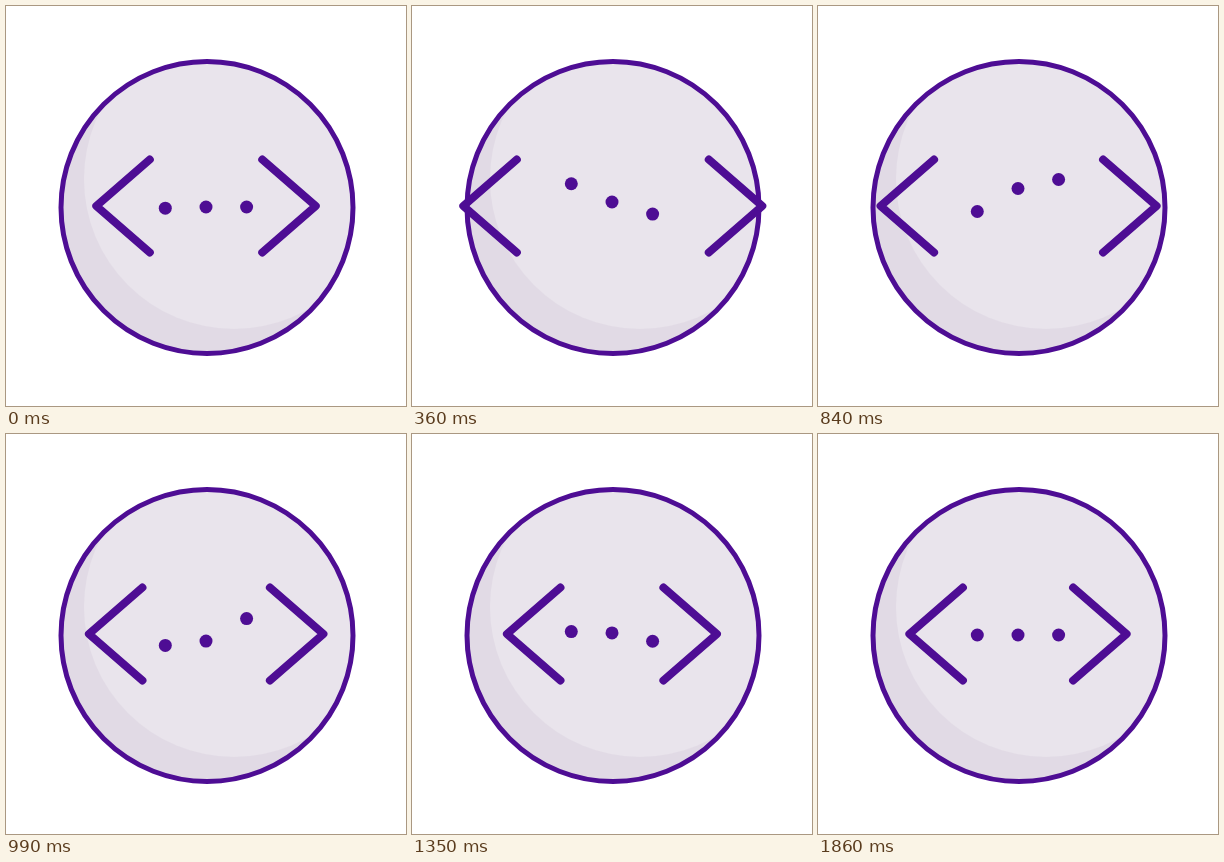
Animation, 400 px wide and 400 px high, one loop 1.92 s. Source, as an HTML page with a canvas:

```html
<!DOCTYPE html>
<html lang="en">
<head>
<meta charset="utf-8">
<title>Code badge</title>
<style>
  html, body { margin: 0; width: 100%; height: 100%; overflow: hidden; background: #fff; }
  canvas { display: block; width: 400px; height: 400px; }
</style>
</head>
<body>
<canvas id="stage" width="400" height="400"></canvas>
<script>
const ctx = document.getElementById('stage').getContext('2d');

const LOOP = 1920, STEP = 30, LAST = 62;
const INK = '#4e0d94', LIGHT = '#e9e4ec', SHADE = '#e1dae5';
const DOT_DELAY = 4.5;

// Smooth monotone curve through [step, value] points, flat at the extremes.
function curve(pts) {
  const sec = pts.slice(1).map((p, i) => (p[1] - pts[i][1]) / (p[0] - pts[i][0]));
  const slope = pts.map((_, i) => {
    const a = sec[i - 1] || 0, b = sec[i] || 0;
    if (a * b <= 0) return 0;
    const m = Math.min(Math.abs(a + b) / 2, 3 * Math.abs(a), 3 * Math.abs(b));
    return Math.sign(a) * m;
  });
  return x => {
    const end = pts.length - 1;
    if (x <= pts[0][0]) return pts[0][1];
    if (x >= pts[end][0]) return pts[end][1];
    let i = 0;
    while (x > pts[i + 1][0]) i++;
    const [x0, y0] = pts[i], [x1, y1] = pts[i + 1];
    const h = x1 - x0, u = (x - x0) / h, v = 1 - u;
    return y0 * (1 + 2 * u) * v * v + y1 * u * u * (3 - 2 * u)
      + h * u * v * (slope[i] * v - slope[i + 1] * u);
  };
}

const spread = curve([[-1.5, 0], [14, 42], [22, 42], [39.7, -7.4], [50, 0]]);
const bounce = curve([
  [-1.2, 201], [3.5, 208.3], [7.5, 196], [11, 180.7], [15, 173], [18, 173],
  [20, 174.8], [23.5, 182.5], [28, 205.5], [32, 211.8], [42.8, 197.2], [53.5, 201]
]);

function disc(x, y, r, color) {
  ctx.beginPath();
  ctx.arc(x, y, r, 0, Math.PI * 2);
  ctx.fillStyle = color;
  ctx.fill();
}

function chevron(tip, dir) {
  const end = tip + dir * 53.5;
  ctx.beginPath();
  ctx.moveTo(end, 153.5);
  ctx.lineTo(tip, 200);
  ctx.lineTo(end, 246.5);
  ctx.lineWidth = 8;
  ctx.stroke();
}

function badge() {
  ctx.save();
  disc(201, 201.5, 146, SHADE);
  ctx.clip();
  disc(228, 173, 150, LIGHT);
  ctx.restore();
  ctx.beginPath();
  ctx.arc(201, 201.5, 146, 0, Math.PI * 2);
  ctx.lineWidth = 5;
  ctx.stroke();
}

function draw(n) {
  ctx.fillStyle = '#fff';
  ctx.fillRect(0, 0, 400, 400);
  ctx.strokeStyle = INK;
  ctx.lineCap = ctx.lineJoin = 'round';
  badge();
  const d = spread(n);
  chevron(91.4 - d, 1);
  chevron(308.6 + d * 1.04, -1);
  [159.3, 200, 240.6].forEach((x, i) => disc(x, bounce(n - i * DOT_DELAY), 6.5, INK));
}

const start = performance.now();
function tick() {
  const t = (performance.now() - start) % LOOP;
  draw(Math.min(LAST, Math.floor(t / STEP)));
  requestAnimationFrame(tick);
}
tick();
</script>
</body>
</html>
```
